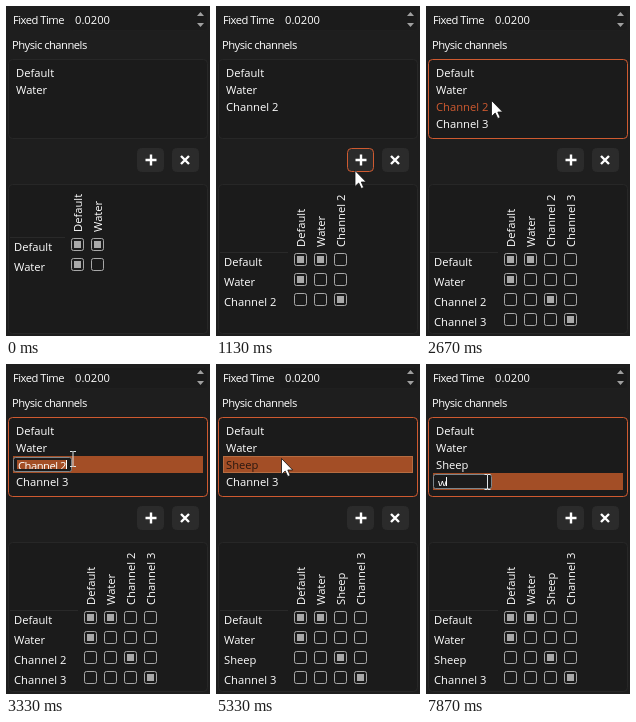
These frames come from a looping animation (204x330 px, 8000 ms). An HTML page:

```html
<!DOCTYPE html>
<html lang="en">
<head>
<meta charset="utf-8">
<title>Physic channels editor</title>
<style>
html, body { margin: 0; width: 100%; height: 100%; overflow: hidden; background: #1e1e1e; }
svg { display: block; font: 11.2px "Open Sans", "Noto Sans", sans-serif; }
text { white-space: pre; }
.tight { letter-spacing: -.5px; }
</style>
</head>
<body>
<svg id="stage" width="204" height="330" viewBox="0 0 204 330"></svg>
<script>
const TICK = 200 / 3, TICKS = 120;
const INK = '#fff', ORANGE = '#cf5a30', SELECT = '#a34e26', FIELD = '#1b1b1b', EDGE = '#272727';
const stage = document.getElementById('stage');

// pointer path: tick, x, y
const PATH = [
  [1, 176, 300], [4, 150, 212], [7, 138.5, 164], [33, 138.5, 164], [36, 80, 139], [40, 65, 94],
  [88, 65, 94], [90, 61, 108], [97, 61, 108], [98, 60, 113], [99, 59, 118]
];

// typed text of both inline edits: tick, text
const EDITS = [
  { row: 2, from: 49, to: 80, off: 56, beam: [67, 95],
    keys: [[49, 'Channel 2'], [62, 'S'], [66, 'Sh'], [70, 'She'], [73, 'Shee'], [76, 'Sheep']] },
  { row: 3, from: 106, to: 120, off: 114, beam: [61.5, 118],
    keys: [[106, 'Channel 3'], [118, 'w']] }
];

const pen = document.createElement('canvas').getContext('2d');
pen.font = '11.2px "Open Sans", "Noto Sans", sans-serif';
const tightWidth = s => pen.measureText(s).width - .5 * s.length;

const text = (x, y, s, fill = INK, more = '') => `<text x="${x}" y="${y}" fill="${fill}" ${more}>${s}</text>`;
const tight = (x, y, s) => text(x, y, s, INK, 'class="tight"');
const rect = (x, y, w, h, fill, more = '') =>
  `<rect x="${x}" y="${y}" width="${w}" height="${h}" fill="${fill}" ${more}/>`;
const frame = (x, y, w, h, fill, edge, r) =>
  rect(x + .5, y + .5, w - 1, h - 1, fill, `stroke="${edge}" rx="${r}"`);
const path = (d, more) => `<path d="${d}" ${more}/>`;

function pointerAt(k) {
  if (k < PATH[0][0]) return null;
  const i = PATH.findIndex(p => p[0] > k);
  if (i < 0) return PATH.at(-1).slice(1);
  const [a, b] = [PATH[i - 1], PATH[i]], f = (k - a[0]) / (b[0] - a[0]);
  return [1, 2].map(j => a[j] + (b[j] - a[j]) * f);
}

function button(x, icon, hover, pressed) {
  return frame(x, 142, 27, 24, pressed ? '#141414' : '#2b2b2b', hover ? ORANGE : '#2b2b2b', 4) +
    path(icon, 'fill="none" stroke="#fff" stroke-width="2.4"');
}

function list(names, selected, hovered, edit, k) {
  return names.map((name, i) => {
    const top = 58 + 17 * i, base = top + 13, sel = i === selected, hot = i === hovered;
    let out = sel ? rect(7, top, 190, 17, SELECT) : '';
    if (edit && edit.row === i) return out + editor(edit, top, k);
    if (sel) out += rect(7.5, top + .5, 189, 16, 'none', 'stroke="#c98a5c" stroke-dasharray="1 1"');
    return out + text(10, base, name, hot ? (sel ? '#2a1710' : ORANGE) : INK);
  }).join('');
}

function editor(edit, top, k) {
  const [since, typed] = edit.keys.filter(e => e[0] <= k).at(-1);
  const untouched = since === edit.from, end = Math.round(12 + tightWidth(typed));
  // the field is too low for the line, so it cuts off the descenders
  return frame(7, top + 1, 59, 15, FIELD, '#7d868b', 2) +
    `<svg x="11" y="${top + 4}" width="52" height="9">` +
    (untouched ? rect(0, 0, 49, 9, SELECT) : '') + tight(1, 9.5, typed) +
    (!untouched || k < edit.off ? rect(end - 11, 0, 1, 9, INK) : '') + '</svg>';
}

function matrix(names) {
  const big = names.length > 2, x0 = big ? 84 : 71, y0 = big ? 253 : 238;
  let out = path(`M4 ${y0 - 6.5}H${x0 - 12}`, 'stroke="#292929"');
  names.forEach((name, r) => {
    const x = x0 + 20 * r + 5, y = y0 - 12;
    out += text(8, y0 + 20 * r + 7, name) + text(x, y, name, INK, `transform="rotate(-90 ${x} ${y})"`);
    names.forEach((_, c) => {
      const cx = x0 + 20 * c, cy = y0 + 20 * r;
      out += frame(cx - 6, cy - 6, 13, 13, 'none', '#a8a8a8', 2);
      if (r + c < 2 || (r === c && r > 1)) out += rect(cx - 3, cy - 3, 7, 7, '#a8a8a8');
    });
  });
  return out;
}

function pointer([x, y], edit, k) {
  if (edit && k > edit.from) {
    const [bx, by] = edit.beam;
    return path(`M${bx - 3} ${by - 7.5}h2.5l.5 .5l.5 -.5h2.5M${bx} ${by - 7}v14M${bx - 3} ${by + 7.5}h2.5l.5 -.5l.5 .5h2.5`,
      'fill="none" stroke="#dfe4e6"');
  }
  return path('M.5 .5V16.5L4.2 13L6.8 18.5L9.2 17.5L6.8 12H11.7Z',
    `transform="translate(${x} ${y})" fill="#fff" stroke="#111" stroke-width=".8"`);
}

function draw(k) {
  const names = ['Default', 'Water'];
  if (k >= 17) names.push(k < 80 ? 'Channel 2' : 'Sheep');
  if (k >= 30) names.push('Channel 3');
  const tip = pointerAt(k), edit = EDITS.find(e => k >= e.from && k < e.to);
  const over = (x, y, w, h) => tip && tip[0] >= x && tip[0] < x + w && tip[1] >= y && tip[1] < y + h;
  const edge = hot => hot ? ORANGE : EDGE;
  const hovered = names.findIndex((_, i) => over(7, 58 + 17 * i, 190, 17));
  const selected = k < 46 ? -1 : k < 103 ? 2 : 3;
  const pressed = k === 15 || k === 16 || k === 29;

  return rect(0, 0, 204, 330, '#1e1e1e') +
    tight(7, 18, 'Fixed Time') + frame(63, 3, 139, 22, FIELD, '#1f1f1f', 3) + text(69, 18, '0.0200') +
    path('M191 10l3.5 -4l3.5 4zM191 17l3.5 4l3.5 -4z', 'fill="#a0a0a0"') +
    tight(6, 43, 'Physic channels') +
    frame(2, 53, 200, 80, FIELD, edge(over(2, 53, 200, 80)), 4) +
    list(names, selected, hovered, edit, k) +
    button(131, 'M139.5 154h11M145 148.5v11', over(131, 142, 27, 24), pressed) +
    button(166, 'M175 150l8 8m0 -8l-8 8', over(166, 142, 27, 24)) +
    frame(2, 178, 200, 150, FIELD, edge(over(2, 178, 200, 150)), 4) +
    matrix(names) + (tip ? pointer(tip, edit, k) : '');
}

let shown = -1;
function tick() {
  const k = Math.floor((performance.now() + 4) / TICK) % TICKS;
  if (k !== shown) stage.innerHTML = draw(shown = k);
  requestAnimationFrame(tick);
}
tick();
</script>
</body>
</html>
```
